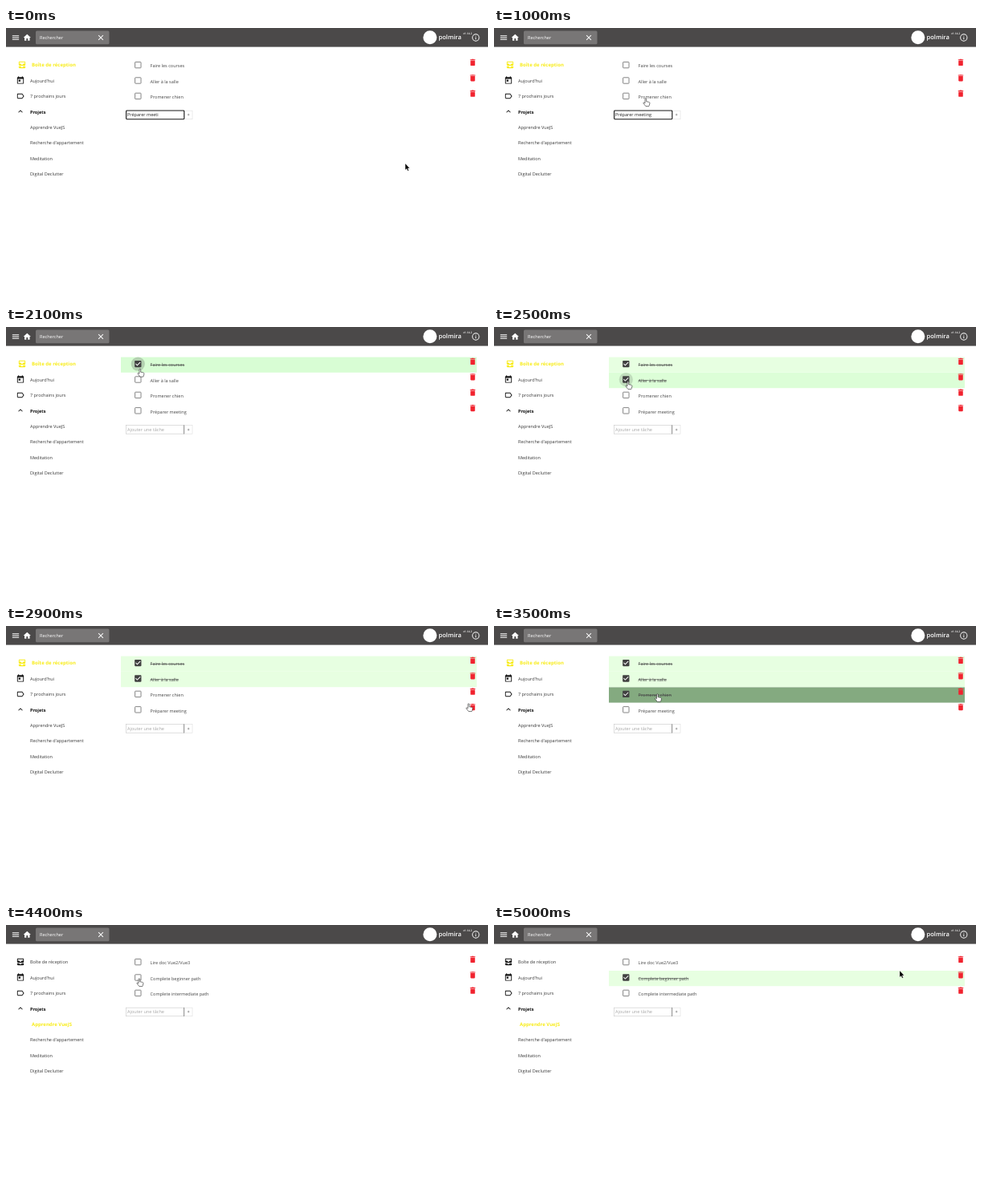
Recreate the animation shown at these times as an HTML page. Size 600 by 338 pixels, loop 5100 ms.

```html
<!DOCTYPE html>
<html lang="fr">
<head>
<meta charset="utf-8">
<title>Liste de tâches</title>
<style>
html, body { margin: 0; width: 100%; height: 100%; overflow: hidden; background: #fff; }
svg { display: block; width: 100vw; height: 100vh; }
text { font: 5.54px "Open Sans", "Noto Sans", sans-serif; text-rendering: geometricPrecision; white-space: pre; }
.active { font-size: 6px; font-weight: 700; }
.bold { font-weight: 700; }
.brand { font-size: 7.6px; font-weight: 600; }
.version { font-size: 3.3px; font-weight: 600; }
.done { text-decoration: line-through; }
</style>
</head>
<body>
<svg id="stage" viewBox="0 0 600 338"></svg>
<script>
const LOOP = 5100, STEP = 100, PITCH = 19.45;
const YELLOW = [248, 236, 28], INK = [58, 58, 58], LEAF = [26, 104, 28], MINT = [231, 255, 225];

const ICONS = {
  menu: 'M3 18h18v-2H3zM3 13h18v-2H3zM3 6v2h18V6z',
  home: 'M10 20v-6h4v6h5v-8h3L12 3 2 12h3v8z',
  close: 'M19 6.4 17.6 5 12 10.6 6.4 5 5 6.4 10.6 12 5 17.6 6.4 19 12 13.4 17.6 19 19 17.6 13.4 12z',
  info: 'M11 17h2v-6h-2zM12 2a10 10 0 1 0 0 20 10 10 0 0 0 0-20zm0 18a8 8 0 1 1 0-16 8 8 0 0 1 0 16zM11 9h2V7h-2z',
  inbox: 'M19 3H5c-1.1 0-2 .9-2 2v7c0 1.1.9 2 2 2h14c1.1 0 2-.9 2-2V5c0-1.1-.9-2-2-2zm0 6h-4c0 1.6-1.4 3-3 3s-3-1.4-3-3H5V5h14zm-4 7h6v3c0 1.1-.9 2-2 2H5c-1.1 0-2-.9-2-2v-3h6c0 1.7 1.3 3 3 3s3-1.3 3-3z',
  today: 'M19 3h-1V1h-2v2H8V1H6v2H5c-1.1 0-2 .9-2 2v14c0 1.1.9 2 2 2h14c1.1 0 2-.9 2-2V5c0-1.1-.9-2-2-2zm0 16H5V8h14zM7 10h5v5H7z',
  label: 'M17.6 5.8C17.3 5.3 16.7 5 16 5H5c-1.1 0-2 .9-2 2v10c0 1.1.9 2 2 2h11c.7 0 1.3-.3 1.6-.8L22 12zM16 17H5V7h11l3.5 5z',
  up: 'M12 8l-6 6 1.4 1.4 4.6-4.6 4.6 4.6L18 14z',
  trash: 'M6 19c0 1.1.9 2 2 2h8c1.1 0 2-.9 2-2V7H6zM19 4h-3.5l-1-1h-5l-1 1H5v2h14z',
  checked: 'M19 3H5c-1.1 0-2 .9-2 2v14c0 1.1.9 2 2 2h14c1.1 0 2-.9 2-2V5c0-1.1-.9-2-2-2zm-9 14l-5-5 1.4-1.4 3.6 3.6 7.6-7.6L19 8z'
};

const INBOX = ['Faire les courses', 'Aller à la salle', 'Promener chien', 'Préparer meeting'];
const VUE = ['Lire doc Vue2/Vue3', 'Complete beginner path', 'Complete intermediate path'];
const PROJECTS = ['Apprendre VueJS', "Recherche d'appartement", 'Meditation', 'Digital Declutter'];

const ADDED = 1300, SWITCH = 3700;
// row: click time, flash colour, ripple on the box
const INBOX_CLICKS = [
  [2100, [216, 253, 212], true],
  [2400, [216, 253, 212], true],
  [3400, [132, 170, 128], false]
];
const VUE_CLICKS = [null, [4600, [216, 253, 212], true]];

// time, x, y of the pointer tip
const PATH = [
  [0, 497, 169], [800, 497, 169], [1000, 189, 88], [1200, 226, 106], [1400, 226, 106],
  [1900, 166, 50], [2100, 167, 52.5], [2300, 166, 66], [2500, 167, 68], [2600, 220, 84],
  [2900, 576, 97], [3000, 576, 97], [3300, 204, 86], [3500, 203.5, 85], [3700, 67, 129],
  [3900, 67, 129], [4300, 166, 67], [4600, 166, 67], [5000, 505, 57]
];

const clamp = v => Math.max(0, Math.min(1, v));
const mix = (a, b, k) => a + (b - a) * k;
const blend = (a, b, k) => `rgb(${a.map((v, i) => Math.round(mix(v, b[i], k)))})`;
const text = (x, y, s, fill, cls = '') => `<text x="${x}" y="${y}" fill="${fill}" class="${cls}">${s}</text>`;
const rect = (x, y, w, h, attrs) => `<rect x="${x}" y="${y}" width="${w}" height="${h}" ${attrs}/>`;
const icon = (name, x, y, fill) =>
  `<path d="${ICONS[name]}" fill="${fill}" fill-rule="evenodd" transform="translate(${x} ${y}) scale(.463) translate(-12 -12)"/>`;

function header() {
  return rect(0, 0, 600, 23.6, 'fill="#4b4949"') +
    icon('menu', 12, 12, '#fff') + icon('home', 26.3, 12, '#fff') +
    rect(37, 3.5, 91.5, 16.8, 'rx="1.6" fill="#787676"') +
    text(42, 14.2, 'Rechercher', '#fff') + icon('close', 118, 12, '#fff') +
    '<circle cx="527.8" cy="11.8" r="8.5" fill="#fff"/>' +
    text(538.5, 14.4, 'polmira', '#fff', 'brand') +
    text(569, 7.6, 'v1.14.2', '#fff', 'version') + icon('info', 584.8, 12, '#fff');
}

function sidebar(t) {
  const k = clamp((t - SWITCH) / 200), onVue = t >= SWITCH;
  const y = i => 48.2 + PITCH * i;
  const ink = blend(INK, INK, 0);
  const item = (s, i, fill, on) => text(on ? 32 : 30, y(i), s, fill, on ? 'active' : '');
  const fromYellow = blend(YELLOW, INK, k);
  return icon('inbox', onVue ? 18 : 20, 46, blend(YELLOW, [20, 20, 20], k)) +
    item('Boîte de réception', 0, fromYellow, !onVue) +
    icon('today', 18, 65.4, '#141414') + item('Aujourd\'hui', 1, ink) +
    icon('label', 18, 85, '#141414') + item('7 prochains jours', 2, ink) +
    icon('up', 18, 104, '#141414') + text(30, y(3), 'Projets', '#111', 'bold') +
    PROJECTS.map((s, i) => i ? item(s, 4 + i, ink) : item(s, 4, blend(INK, YELLOW, k), onVue)).join('');
}

function row(s, i, t, click, born) {
  const y = 46.1 + 19.4 * i, fresh = 1 - clamp((t - born) / 400);
  const done = click && t >= click[0];
  let out = '';
  if (done) {
    const age = t - click[0];
    out += rect(143, y - 8.5, 443, 19.2, `fill="${blend(click[1], MINT, clamp((age - 100 * !click[2]) / 400))}"`);
    if (click[2] && age < 400) {
      out += `<circle cx="164.3" cy="${y}" r="8.6" fill="#222" opacity="${.2 * (1 - age / 400)}"/>`;
    }
    out += rect(161, y - 3.5, 6.6, 7, 'fill="#fff"') + icon('checked', 164.3, y, '#414141');
  } else {
    if (fresh) out += rect(143, y - 8.5, 443, 19.4, `fill="#f8fff0" opacity="${fresh * .7}"`);
    out += rect(160.6, y - 3.7, 7.4, 7.4,
      `rx=".6" fill="rgba(70,135,70,${fresh * .55})" stroke="${blend([118, 118, 118], LEAF, fresh)}" stroke-width=".9"`);
  }
  return out + text(179.6, y + 3.3, s, blend([70, 70, 70], LEAF, fresh), done ? 'done' : '') +
    icon('trash', 581, y - 3.2, '#f1232f');
}

function entry(rows, t) {
  const y = 44.6 + 19.45 * rows, focus = t < ADDED;
  let out = rect(222, y + .2, 10, 10.6, 'fill="#fff" stroke="#ddd" stroke-width=".6"') +
    text(225.4, y + 7.4, '+', '#333');
  if (!focus) {
    return out + rect(149.4, y + .2, 72.4, 10.6, 'fill="#fff" stroke="#c8c8c8" stroke-width=".6"') +
      rect(221.2, y, .7, 11, 'fill="#777"') + text(151, y + 7.4, 'Ajouter une tâche', '#a6a6a6');
  }
  const typed = 'Préparer meeti' + 'ng'.slice(0, t < 600 ? 0 : t < 700 ? 1 : 2);
  const caret = (t >= 200 && t < 400) || (t >= 600 && t < 900);
  const end = t < 600 ? 189.3 : t < 700 ? 192.8 : 196.8;
  out += rect(149.6, y + .1, 72.2, 10.7, 'rx=".9" fill="#fff" stroke="#161616" stroke-width="1.1"') +
    text(151, y + 7.4, typed, '#222');
  return caret ? out + rect(end, y + 2, .5, 7.2, 'fill="#111"') : out;
}

function pointer(t) {
  let i = 0;
  while (i < PATH.length - 2 && t >= PATH[i + 1][0]) i++;
  const [t0, x0, y0] = PATH[i], [t1, x1, y1] = PATH[i + 1];
  const k = clamp((t - t0) / (t1 - t0)), e = k * k * (3 - 2 * k);
  const at = `transform="translate(${mix(x0, x1, e)} ${mix(y0, y1, e)})"`;
  if (t >= 1000 && t < 5000) {
    return `<path ${at} d="M-1 .6c0-1.1 1.7-1.1 1.7 0v3.1l2.9.6c1 .2 1.4.8 1.3 1.7l-.6 2.4-.5 1.2H-.1L-2.9 6c-.5-.8.4-1.5 1.1-.9l.8.7z" fill="#fff" stroke="#222" stroke-width=".6"/>`;
  }
  return `<path ${at} d="M0 0v8l1.8-1.6 1.3 2.8 1.3-.6-1.3-2.7h2.4z" fill="#000" stroke="#fff" stroke-width=".3"/>`;
}

function draw(t) {
  const onVue = t >= SWITCH;
  const tasks = onVue ? VUE : INBOX.slice(0, t < ADDED ? 3 : 4);
  const clicks = onVue ? VUE_CLICKS : INBOX_CLICKS;
  const born = i => onVue ? SWITCH : i === 3 ? ADDED : -LOOP;
  return header() + sidebar(t) +
    tasks.map((s, i) => row(s, i, t, clicks[i], born(i))).join('') +
    entry(tasks.length, t) + pointer(t);
}

const stage = document.getElementById('stage');
const start = performance.now();
let shown = -1;
function tick() {
  const t = Math.floor((performance.now() - start) % LOOP / STEP) * STEP;
  if (t !== shown) {
    shown = t;
    stage.innerHTML = draw(t);
  }
  requestAnimationFrame(tick);
}
tick();
</script>
</body>
</html>
```
